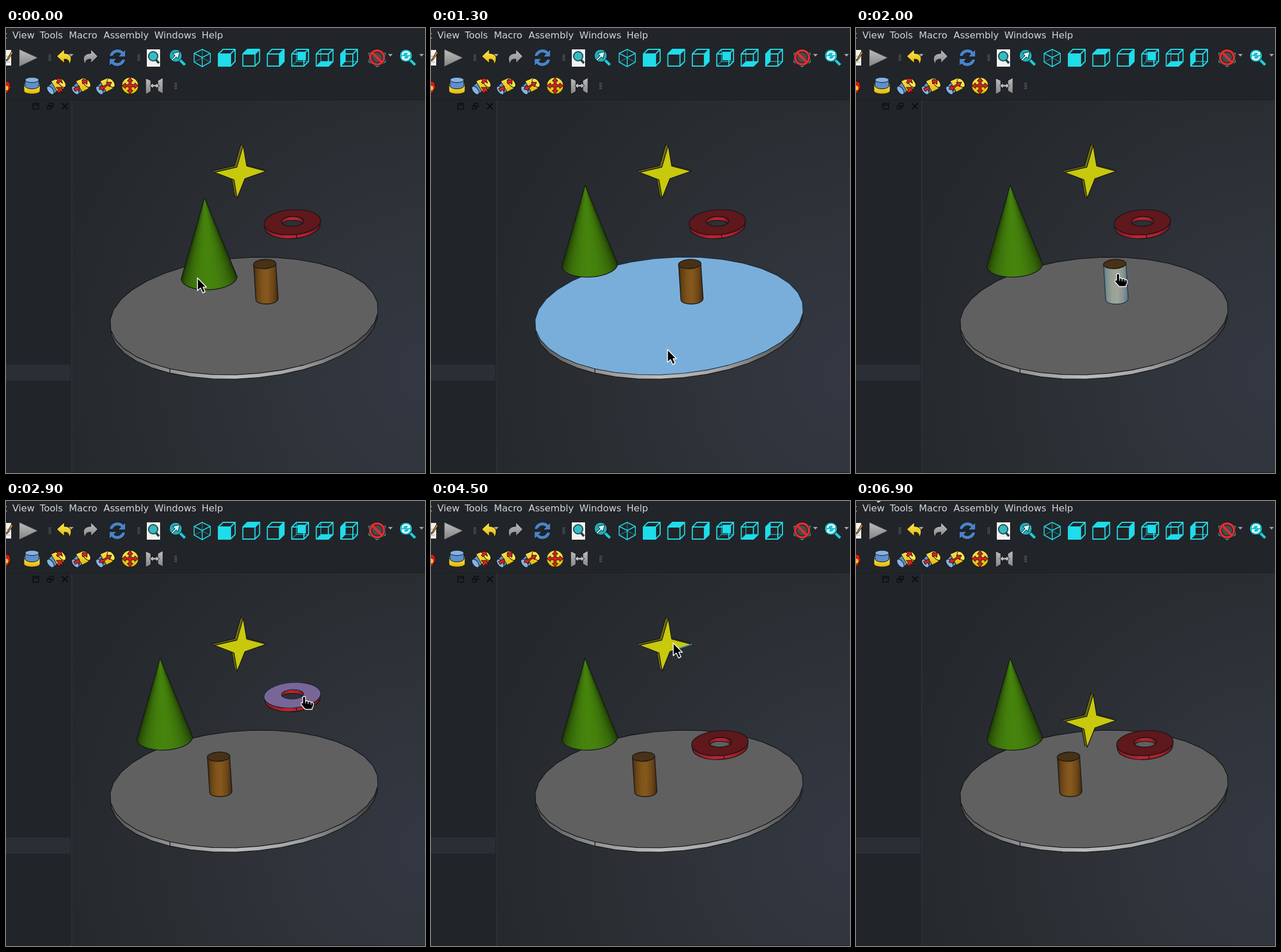
Recreate the animation shown at these times as an HTML page. Size 726x771 px, loop 7100 ms.

```html
<!DOCTYPE html>
<html lang="en">
<head>
<meta charset="utf-8">
<title>Assembly drag</title>
<style>
html, body { margin: 0; width: 100%; height: 100%; overflow: hidden; background: #212529; }
svg { display: block; width: 100vw; height: 100vh; }
.menu { font: 16.3px "DejaVu Sans", sans-serif; fill: #d3d4d5; }
.edge { stroke: #14171a; stroke-width: 1.3; stroke-linejoin: round; }
.glow { fill: rgb(26,78,122); mix-blend-mode: plus-lighter; visibility: hidden; }
.on .glow { visibility: visible; }
.wire { fill: none; stroke: #1fdcea; stroke-width: 1.9; stroke-linejoin: round; }
.ink { stroke: #101316; stroke-width: 1; stroke-linejoin: round; }
</style>
</head>
<body>
<svg viewBox="0 0 726 771">
  <defs>
    <radialGradient id="view" gradientUnits="userSpaceOnUse" cx="735" cy="600" r="690">
      <stop offset="0" stop-color="#343843"/><stop offset=".45" stop-color="#2e3238"/><stop offset="1" stop-color="#24282b"/>
    </radialGradient>
    <linearGradient id="rim">
      <stop offset="0" stop-color="#505050"/><stop offset=".22" stop-color="#929292"/><stop offset=".46" stop-color="#bdbdbd"/>
      <stop offset=".7" stop-color="#a2a2a2"/><stop offset=".9" stop-color="#606060"/><stop offset="1" stop-color="#353535"/>
    </linearGradient>
    <linearGradient id="brown">
      <stop offset="0" stop-color="#42290d"/><stop offset=".15" stop-color="#664315"/><stop offset=".35" stop-color="#7f531b"/>
      <stop offset=".55" stop-color="#86591d"/><stop offset=".8" stop-color="#6d4717"/><stop offset="1" stop-color="#42290d"/>
    </linearGradient>
    <linearGradient id="red">
      <stop offset="0" stop-color="#84181f"/><stop offset=".4" stop-color="#bd2430"/><stop offset=".75" stop-color="#b3202b"/>
      <stop offset="1" stop-color="#66151a"/>
    </linearGradient>
    <linearGradient id="steel" x2="0" y2="1"><stop offset="0" stop-color="#bdbdbd"/><stop offset="1" stop-color="#858585"/></linearGradient>
    <linearGradient id="gold" x2="0" y2="1"><stop offset="0" stop-color="#ffe75a"/><stop offset="1" stop-color="#e2b500"/></linearGradient>
    <path id="starShape" d="M411 203L417 239 451 248 414 261 400.500 295 395 263 361 250 400 241Z"/>
    <path id="grip" fill="#777b7e" d="M-2-6h1.500v1.500h-1.500zM.5-6H2v1.500H.5zM-2-3h1.500v1.500h-1.500zM.5-3H2v1.500H.5zM-2 0h1.500v1.500h-1.500zM.5 0H2v1.500H.5zM-2 3h1.500v1.500h-1.500zM.5 3H2v1.500H.5z"/>
    <path id="drop" d="M-4-2H4L0 2.500Z" fill="#a4a7a9"/>
    <g id="joint" class="ink">
      <path d="M-15 1L-7-7 4 6-5 14-10 14Z" fill="#5d8fca"/>
      <path d="M-9-9L5-15 15-3 13 4 2 10Z" fill="url(#gold)"/>
      <ellipse cx="-10" cy="7" rx="4.500" ry="8.500" transform="rotate(-38 -10 7)" fill="#84b2e3"/>
      <ellipse cx="10" cy="-6" rx="5" ry="9" transform="rotate(-38 10 -6)" fill="#ffe34d"/>
    </g>
  </defs>

  <rect width="726" height="771" fill="#212529"/>
  <rect x="115" y="125" width="611" height="646" fill="url(#view)"/>
  <path d="M114 125V771" stroke="#2c3034" stroke-width="2.500"/>
  <path d="M0 124.500H726M115 770.500H726" stroke="#1b1f22"/>
  <rect y="583" width="111.500" height="28" fill="#2a2e35"/>
  <g fill="none" stroke="#0b0d0e" stroke-width="1.400">
    <path d="M46.500 130.500h10v10h-10zM46.500 133.500h10M75 130.500h7v6h-7zM71.500 134.500h7v6h-7z"/>
    <path d="M97 130.500l10 10m0-10l-10 10" stroke-width="2"/>
  </g>

  <g class="menu">
    <text x="2" y="18" text-anchor="end">Edit</text><text x="11" y="18">View</text><text x="58.500" y="18">Tools</text>
    <text x="109" y="18">Macro</text><text x="169" y="18">Assembly</text><text x="257" y="18">Windows</text><text x="339" y="18">Help</text>
  </g>

  <g id="toolbar">
    <path d="M-5 38H9V65H-5Z" fill="#f1f1ee"/><path d="M0 49h7M0 54h6M0 59h7" stroke="#999"/>
    <path d="M10 40L12 43 3 56 0 57Z" fill="#e58b1b" class="ink"/>
    <path d="M23.500 37.500V66L54 51.500Z" fill="url(#steel)" stroke="#777"/>
    <use href="#grip" x="76" y="52"/><use href="#grip" x="230" y="52"/><use href="#grip" x="294" y="101"/>
    <path d="M88 49L101 37V44C112 44 117 52 109 64 110 56 107 54 101 54V61Z" fill="url(#gold)" class="ink"/>
    <path d="M159 49L147 37V44C136 44 130 52 138 64 137 56 140 54 147 54V61Z" fill="url(#steel)" class="ink"/>
    <use href="#drop" x="113" y="47"/><use href="#drop" x="666" y="47"/><use href="#drop" x="720" y="47"/>
    <g fill="#4a83c8" class="ink">
      <path id="swirl" d="M179 49C181 36 197 33 203 41L207 37V50H194L199 45C194 41 187 43 185 49Z"/>
      <use href="#swirl" transform="rotate(180 193 51.500)"/>
    </g>
    <path d="M244 37H267V67H244Z" fill="#f2f2ef"/>
    <path d="M259 54L265 61" stroke="#1a444b" stroke-width="4"/><circle cx="255" cy="49" r="8" fill="#37bac4" stroke="#1d4d54" stroke-width="2"/>
    <path d="M301 55L310 64" stroke="#0a3438" stroke-width="7"/><path d="M301 55L310 64" stroke="#25cbd8" stroke-width="4.500"/>
    <circle cx="294" cy="48" r="11" fill="#20aebb" class="ink"/><path d="M286 55L293 48 289 44 301 41 298 53 295 50 288 57Z" fill="#d8ffff" class="ink"/>
    <path class="wire" style="stroke-width:1.500" d="M340 37L354 44V59L340 67 326 59V44ZM326 44L340 51 354 44M340 51V67"/>
    <path d="M340 37V52L326 59M340 52L354 59" class="wire" style="stroke-width:1;opacity:.65"/>
    <g id="cubes"></g>
    <path class="wire" style="stroke-width:1.400" d="M643 37L657 44V59L643 67 629 59V44Z"/>
    <circle cx="643" cy="51" r="12" fill="#454b50" stroke="#101316" stroke-width="6"/>
    <circle cx="643" cy="51" r="12" fill="none" stroke="#d93030" stroke-width="4"/><path d="M635 43L651 59" stroke="#d93030" stroke-width="4"/>
    <path d="M700 55L709 64" stroke="#0a3438" stroke-width="7"/><path d="M700 55L709 64" stroke="#25cbd8" stroke-width="4.500"/>
    <circle cx="693" cy="48" r="11" fill="#22bdca" class="ink"/>
    <path d="M687 47A6 6 0 0 1 698 44M699 49A6 6 0 0 1 688 52" fill="none" stroke="#eaffff" stroke-width="2.500"/><path d="M700 41V47H694ZM686 55V49H692Z" fill="#eaffff"/>

    <path d="M-2 91L6 94 8 103 2 113H-2Z" fill="#d01c16" class="ink"/><circle cx="0" cy="104" r="4" fill="#f2cc26"/>
    <g class="ink">
      <path d="M31 98V109C32 116 58 116 59 109V98Z" fill="url(#gold)"/><ellipse cx="45" cy="98" rx="14" ry="5" fill="#ffe34d"/>
      <path d="M33 90V101C35 107 55 107 57 101V90Z" fill="#5d8fca"/><ellipse cx="45" cy="90" rx="12" ry="4.500" fill="#84b2e3"/>
    </g>
    <use href="#joint" x="87" y="101"/><use href="#joint" x="130" y="101"/><use href="#joint" x="172" y="101"/>
    <g fill="#df2018" class="ink">
      <path d="M85 88L95 87 98 96 94 93 90 97 87 94 90 91ZM87 103L97 103 99 112 95 109 92 113 88 110 91 107Z"/>
      <path d="M132 90L141 89 140 98 137 95 133 97 132 94ZM117 105L127 100 127 110 124 107 120 110Z"/>
      <path d="M161 106L165 99 167 102 175 97 174 94 183 94 179 102 177 99 169 105 170 108Z"/>
    </g>
    <circle cx="215" cy="100" r="14.500" fill="url(#gold)" class="ink"/>
    <path d="M215 86l5 6h-3v6h6v-3l6 5-6 5v-3h-6v6h3l-5 6-5-6h3v-6h-6v3l-6-5 6-5v3h6v-6h-3Z" fill="#dc2118" class="ink"/>
    <path d="M242 87L251 91V110L242 115ZM272 86L263 91V109L272 114Z" fill="url(#steel)" class="ink"/>
    <path d="M249 100L255 95V98H260V95L266 100 260 105V102H255V105Z" fill="#bbb" class="ink"/>
  </g>

  <g id="disc">
    <polygon id="discRim" class="edge" fill="url(#rim)"/>
    <polygon id="discTop" class="edge" fill="#606060"/>
    <polygon id="discGlow" class="glow"/>
    <path d="M284 590V598" class="edge"/>
  </g>
  <g id="cone">
    <g id="coneShade"></g>
    <polygon id="coneLine" class="edge" fill="none"/>
    <polygon id="coneGlow" class="glow"/>
  </g>
  <g id="cylinder">
    <path class="edge" fill="url(#brown)" d="M429 410L433 471C434 481 470 481 471.500 469L467.500 408Z"/>
    <path class="glow" d="M429 410L433 471C434 481 470 481 471.500 469L467.500 408Z"/>
    <ellipse class="edge" cx="448.300" cy="409" rx="19.500" ry="8" transform="rotate(-3 448.300 409)" fill="#493115"/>
  </g>
  <g id="ring">
    <path class="edge" fill="url(#red)" d="M478.700 338.500A19.500 8.500 0 1 1 514.300 338.500 19.500 8.500 0 0 0 478.700 338.500Z"/>
    <path class="edge" fill="url(#red)" d="M447.200 340L448.500 346.500A47.900 21.500 -4 0 0 544.300 340L545 333A49 21.700 -4 0 1 447.200 340Z"/>
    <path class="edge" fill="#5f181c" fill-rule="evenodd" d="M447.200 340A49 21.700 -4 0 1 545 333 49 21.700 -4 0 1 447.200 340ZM477 335.500A19.500 8.500 -2 0 1 516 334.500 19.500 8.500 -2 0 1 477 335.500Z"/>
    <path class="glow" fill-rule="evenodd" d="M447.200 340A49 21.700 -4 0 1 545 333 49 21.700 -4 0 1 447.200 340ZM477 335.500A19.500 8.500 -2 0 1 516 334.500 19.500 8.500 -2 0 1 477 335.500Z"/>
    <path d="M503.500 357.500V364.500" class="edge"/>
  </g>
  <g id="star">
    <use href="#starShape" x="-4" y="-2.500" class="edge" fill="#716e10"/>
    <use href="#starShape" x="-2.700" y="-1.700" fill="#716e10"/>
    <use href="#starShape" x="-1.300" y="-.8" fill="#716e10"/>
    <use href="#starShape" class="edge" fill="#c8c80c"/>
    <use href="#starShape" class="glow"/>
    <path id="starEdge" d="M428 256L452 248" stroke="#3d9fc4" stroke-width="1.500"/>
  </g>

  <g id="arrow" stroke="#fff" stroke-width="1.500" stroke-linejoin="round">
    <path d="M.7 1V23L6 18.500 10 27 14 25 10.500 17H16.500Z"/>
  </g>
  <g id="hand" stroke="#fff" stroke-width="1.300" stroke-linejoin="round">
    <path d="M-2.500 1Q0-2 2.500 1V8Q5 6 7 9 10 7 12 10 15 9 16 12V17L14 19V22H2L-5 14Q-6 9-2.500 11Z"/>
    <path d="M2.500 8V12M7 9V13M12 10V14" fill="none" stroke-width="1"/>
  </g>
</svg>
<script>
const LOOP = 7100, STEP = 100;
const $ = id => document.getElementById(id);

// Keys are [ms, x, y], linear in between.
const paths = {
  cone: [[400, 0, 0], [1100, -77, -22]],
  cylinder: [[2000, 0, 0], [2400, -68, 24], [2800, -68, 24], [2900, -80, 34]],
  ring: [[3300, 0, 0], [3600, 4.5, 35], [4000, 4.5, 83]],
  star: [[4700, 0, 0], [4900, 0, 31], [5200, 0, 132]],
};
const pointer = [
  [0, 331, 432], [300, 343, 420], [400, 343, 420], [1100, 266, 398], [1200, 345, 444],
  [1300, 409, 556], [1500, 415, 540], [2000, 454, 426], [2400, 386, 450], [2800, 386, 450],
  [2900, 516.5, 339], [3300, 516.5, 339], [3600, 521, 374], [4000, 521, 422], [4100, 476, 339],
  [4500, 419, 245], [4700, 406, 247], [4900, 406, 278], [5200, 406, 379], [5300, 406, 379],
  [5500, 362, 355], [5800, 150, 750], [6000, 70, 240], [6100, 84, 22], [6600, 10, 4], [6900, 28, -25],
];
const glows = { cone: [100, 1300], disc: [1300, 1800], cylinder: [1900, 2900], ring: [2900, 4100], star: [4600, 5600] };
const handTimes = [[200, 1200], [1900, 4100], [4600, 5400]];

function at(keys, t) {
  const next = keys.findIndex(k => k[0] > t);
  if (next === 0) return keys[0].slice(1);
  if (next < 0) return keys[keys.length - 1].slice(1);
  const [t0, x0, y0] = keys[next - 1], [t1, x1, y1] = keys[next];
  const u = (t - t0) / (t1 - t0);
  return [x0 + (x1 - x0) * u, y0 + (y1 - y0) * u];
}
const within = (t, [from, to]) => t >= from && t < to;
const move = (el, [x, y]) => el.setAttribute('transform', `translate(${x} ${y})`);
const setPoints = (id, points) => $(id).setAttribute('points', points);

function tiltedEllipse(cx, cy, rx, ry) {
  return Array.from({ length: 36 }, (_, i) => {
    const a = (123.6 + i * 10) * Math.PI / 180;
    return `${(cx + rx * Math.cos(a)).toFixed(1)},${(cy + ry * Math.sin(a - 0.125)).toFixed(1)}`;
  }).join(' ');
}
setPoints('discRim', tiltedEllipse(412.5, 508.5, 231.5, 100));
for (const id of ['discTop', 'discGlow']) setPoints(id, tiltedEllipse(412.5, 499, 232.5, 102));

// The cone is lit from the viewer; each slice runs on to the right edge so no seams show.
const SLICES = 40, APEX = '344,294';
const sliceAngle = i => (i / SLICES - 0.5) * Math.PI;
const base = Array.from({ length: SLICES + 1 }, (_, i) => {
  const a = sliceAngle(i);
  return `${(352 + 48.3 * Math.sin(a)).toFixed(1)},${(432.5 + 21 * Math.cos(a) - 2 * Math.sin(a)).toFixed(1)}`;
});
$('coneShade').innerHTML = base.slice(0, -1).map((_, i) => {
  const light = 0.36 + 0.64 * Math.cos(sliceAngle(i + 0.5));
  const fill = [70, 132, 13].map(c => Math.round(c * light));
  return `<polygon points="${APEX} ${base.slice(i).join(' ')}" fill="rgb(${fill})"/>`;
}).join('');
for (const id of ['coneLine', 'coneGlow']) setPoints(id, `${APEX} ${base.join(' ')}`);

const cubeFaces = [
  'M-14-6H7V15H-14Z', 'M-14-6L-6-14H15L7-6Z', 'M7-6L15-14V7L7 15Z',
  'M-6-14H15V7H-6Z', 'M-14 15L-6 7H15L7 15Z', 'M-14-6L-6-14V7L-14 15Z',
];
const hiddenEdges = 'M-6-14V7L-14 15M-6 7H15';
$('cubes').innerHTML = cubeFaces.map((face, i) => `<g transform="translate(${382 + i * 42.4} 51)">
  <path d="${face}" fill="#1fdcea"${i === 3 ? ' transform="scale(.7)"' : ''}/>
  ${i > 2 ? `<path class="wire" style="stroke-width:1" d="${hiddenEdges}"/>` : ''}
  <path class="wire" d="${cubeFaces.slice(0, 3).join('')}"/></g>`).join('');

function draw(now) {
  const t = Math.floor(now % LOOP / STEP) * STEP;
  for (const id in paths) move($(id), at(paths[id], t));
  for (const id in glows) $(id).classList.toggle('on', within(t, glows[id]));
  $('starEdge').style.visibility = t === 4500 ? 'visible' : 'hidden';
  const isHand = handTimes.some(span => within(t, span));
  for (const [id, shown] of [['hand', isHand], ['arrow', !isHand]]) {
    move($(id), at(pointer, t));
    $(id).style.display = shown ? '' : 'none';
  }
}
const start = performance.now();
function tick() {
  draw(performance.now() - start);
  requestAnimationFrame(tick);
}
tick();
</script>
</body>
</html>
```
